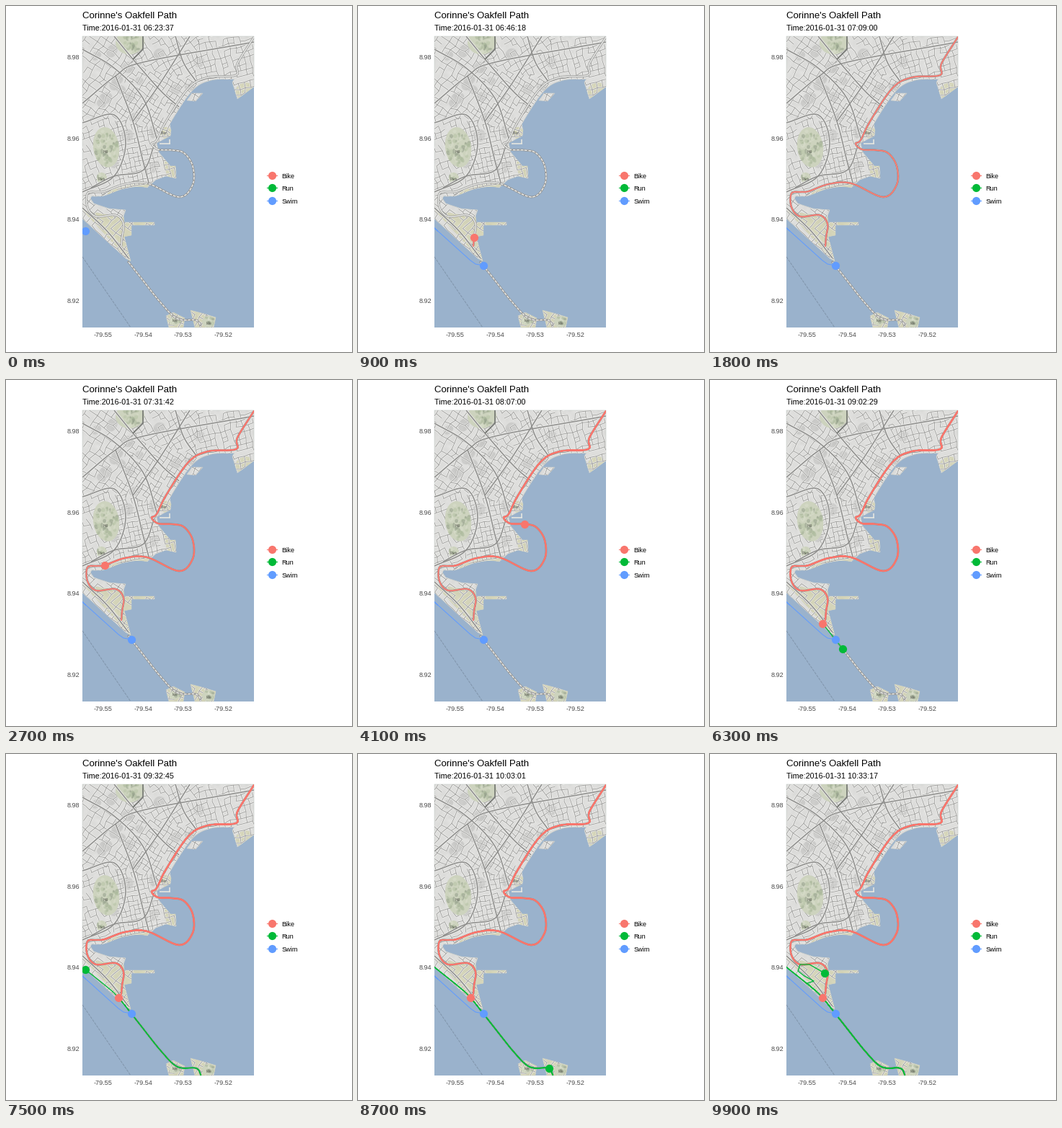
These frames come from a looping animation (480x480 px, 10000 ms). A matplotlib script:

```python
import numpy as np
import matplotlib.pyplot as plt
from matplotlib.animation import FuncAnimation
from matplotlib.collections import LineCollection
from matplotlib.patches import Ellipse, PathPatch, Polygon, Rectangle
from matplotlib.path import Path

SIZE, DPI, FRAMES = 480, 100, 100
PX = 72 / DPI
RED, GREEN, BLUE = "#F8766D", "#00BA38", "#619CFF"
LEFT, TOP, RIGHT, BOTTOM = 106, 42, 344, 446

plt.rcParams["font.family"] = "Liberation Sans"
rng = np.random.default_rng(8)

fig = plt.figure(figsize=(SIZE / DPI, SIZE / DPI), dpi=DPI, facecolor="white")
ax = fig.add_axes([0, 0, 1, 1])
ax.set(xlim=(0, SIZE), ylim=(SIZE, 0))
ax.axis("off")


# ---- geometry helpers ---------------------------------------------------
def curve(pts, m=8):
    """Catmull-Rom spline through a few key points."""
    p = np.array(pts, float)
    p = np.vstack([2 * p[0] - p[1], p, 2 * p[-1] - p[-2]])
    t = (np.arange(m) / m)[:, None]
    parts = [0.5 * (2 * b + (c - a) * t + (2 * a - 5 * b + 4 * c - d) * t**2
                    + (3 * b - a - 3 * c + d) * t**3)
             for a, b, c, d in zip(p, p[1:], p[2:], p[3:])]
    return np.vstack(parts + [p[-2:-1]])


def near(route, x, y):
    return int(np.argmin(np.hypot(route[:, 0] - x, route[:, 1] - y)))


def between(route, a, b):
    i, j = near(route, *a), near(route, *b)
    return route[i:j + 1] if i <= j else route[j:i + 1][::-1]


def shuttle(route, stops):
    """Travel along a route from stop to stop; also give each stop's index."""
    path, marks = [route[stops[0]]], [0]
    for i, j in zip(stops, stops[1:]):
        step = 1 if j > i else -1
        path += [route[k] for k in range(i + step, j + step, step)]
        marks.append(len(path) - 1)
    return np.array(path), marks


# ---- routes -------------------------------------------------------------
bike = curve([(160, 333), (161, 321), (163, 302), (152, 290), (125, 292),
              (113, 279), (113, 260), (126, 258), (137, 257), (165, 247),
              (196, 246), (240, 265), (259, 248), (259, 222), (247, 204),
              (231, 200), (211, 199), (202, 191), (209, 186), (222, 160),
              (253, 114), (280, 99), (319, 96), (321, 80), (344, 43)])
bike_far = np.vstack([bike, (530, -130)])
shore_run = curve([(100, 291), (110, 299), (140, 323), (156, 338), (184, 373),
                   (215, 412), (238, 434), (264, 436), (271, 447)])
run_end = [(135, 318), (144, 315), (131, 308), (122, 301), (125, 292),
           (138, 292), (159, 304)]
swim = np.array([(110, 312), (105, 307), (156, 353), (163, 358), (174, 360)], float)


class Track:
    """A path with a marker at its head; knots pair frames with vertices."""

    def __init__(self, pts, knots, color, width):
        self.pts = pts
        self.dist = np.r_[0, np.cumsum(np.hypot(*np.diff(pts, axis=0).T))]
        self.when = [frame for frame, _ in knots]
        self.where = [self.dist[i] for _, i in knots]
        self.line, = ax.plot([], [], color=color, lw=width * PX, zorder=10,
                             solid_joinstyle="round")
        self.dot, = ax.plot([], [], "o", color=color, ms=11.2 * PX, mew=0,
                            zorder=11)

    def update(self, n):
        if n < self.when[0]:
            self.line.set_data([], [])
            self.dot.set_data([], [])
            return
        d = np.interp(n, self.when, self.where)
        head = [np.interp(d, self.dist, axis) for axis in self.pts.T]
        self.line.set_data(*np.vstack([self.pts[self.dist < d], head]).T)
        self.dot.set_data([head[0]], [head[1]])


far, turn = len(bike), near(bike, 126, 258)
bike_path, b = shuttle(bike_far, [0, far, near(bike, 137, 257), turn, far,
                                  near(bike, 231, 200), turn, far, 0])
bike_path = np.vstack([bike_path, (156, 338)])

south = len(shore_run) - 1
run_path, r = shuttle(shore_run, [near(shore_run, *p) for p in (
    (156, 338), (184, 373), shore_run[south], (110, 299), shore_run[0],
    shore_run[south], (140, 323))])
run_path = np.vstack([run_path, run_end])

tracks = [
    Track(bike_path, [(8.8, 0), (9, near(bike, 161, 321)), (27, b[2]),
                      (41, b[5]), (61, -1)], RED, 1.8),
    Track(run_path, [(61.4, 0), (63, r[1]), (75, r[3]), (99, -1)], GREEN, 1.35),
    Track(swim, [(0, 0), (8.3, -1)], BLUE, 1.05),
]

# ---- base map -----------------------------------------------------------
north_shore = between(bike, (312, 98), (222, 160)) + (5, 4)
south_shore = between(bike, (196, 246), (118, 258)) + (0, 6)
old_town = [(229, 172), (228, 180), (209, 190), (212, 203), (228, 222),
            (235, 222), (236, 239), (222, 236), (208, 241)]
west_bay = [(117, 267), (122, 274), (143, 281), (166, 283), (163, 292)]
pier = [(164, 300), (206, 300), (206, 304), (174, 304), (174, 318)]
mainland = np.vstack([
    [(LEFT, TOP), (RIGHT, TOP), (RIGHT, 112), (321, 129), (314, 106)],
    north_shore, old_town, south_shore, west_bay, pier,
    [(164, 320), (173, 354), (166, 350), (LEFT, 295)]])
isles = [[(222, 430), (232, 425), (248, 433), (246, 446), (226, 446)],
         [(256, 422), (275, 427), (291, 432), (288, 446), (262, 446)],
         [(251, 131), (258, 121), (273, 121), (263, 132)]]

panel = ax.add_patch(Rectangle((LEFT, TOP), RIGHT - LEFT, BOTTOM - TOP,
                               fc="#9AB2CC", lw=0, zorder=0))
shape = Path.make_compound_path(
    *[Path(np.vstack([p, p[:1]]), closed=True) for p in [mainland] + isles])
land = ax.add_patch(PathPatch(shape, fc="#E5E5E3", ec="#C9CFCB", lw=0.6 * PX,
                              zorder=1))


def clip(artist, region=land):
    artist.set_clip_path(region)
    return artist


def blob(x, y, w, h, angle, color, alpha=1.0, z=2.2):
    clip(ax.add_patch(Ellipse((x, y), w, h, angle=angle, fc=color, lw=0,
                              alpha=alpha, zorder=z)))


def strokes(segs, layers, z, region=land):
    for color, width in layers:
        clip(ax.add_collection(LineCollection(
            segs, colors=color, linewidths=width * PX, zorder=z)), region)
        z += 0.05


# beige shores and islands
beige = "#DADABD"
for pts in isles[:2] + [[(106, 283), (150, 291), (208, 298), (208, 306),
                         (165, 322), (175, 358)]]:
    clip(ax.add_patch(Polygon(pts, fc=beige, lw=0, zorder=2)))
for spot in [(230, 226, 18, 40, -15), (170, 254, 60, 10, -12),
             (222, 176, 16, 16, 0), (330, 117, 26, 20, -30)]:
    blob(*spot, beige)

# grey parcels and light relief
for x, y in zip(rng.uniform(108, 270, 24), rng.uniform(45, 225, 24)):
    blob(x, y, *rng.uniform(9, 20, 2), rng.uniform(-60, 60), "#CBCBC9", 0.75)
clip(ax.imshow(rng.normal(0, 1, (101, 60)), cmap="gray", alpha=0.07,
               extent=(LEFT, RIGHT, BOTTOM, TOP), interpolation="bilinear",
               zorder=2.5, aspect="auto"))

# wooded hills
for x, y, w, h in [(139, 196, 36, 56), (133, 239, 14, 16), (172, 50, 40, 34),
                   (234, 437, 16, 12), (281, 438, 18, 16)]:
    blob(x, y, w, h, -8, "#CDD3BE", z=3.15)
    for _ in range(w * h // 30):
        rad, a = 0.43 * np.sqrt(rng.random()), rng.uniform(0, 2 * np.pi)
        blob(x + w * rad * np.cos(a), y + h * rad * np.sin(a),
             rng.uniform(2, 6), rng.uniform(3, 8), rng.uniform(-40, 40),
             rng.choice(["#A9B79A", "#B7C4A6", "#929E88", "#DADFCD"]), 0.55,
             z=3.2)

# streets: each district has a centre, a grid angle and a block size
districts = np.array([
    (212, 125, -58, 7), (225, 58, -30, 8), (305, 70, -14, 8), (128, 95, 35, 9),
    (185, 215, -12, 6.5), (122, 215, -22, 8), (135, 310, 41, 8),
    (235, 437, 20, 7), (275, 435, 30, 7)])


def grid(k):
    x, y, angle, step = districts[k]
    u, v = np.meshgrid(*[np.arange(-20, 21) * step] * 2)
    a = np.radians(angle)
    nodes = np.dstack([x + u * np.cos(a) - v * np.sin(a),
                       y + u * np.sin(a) + v * np.cos(a)])
    nodes += rng.normal(0, step**2 / 70, nodes.shape)
    segs = np.concatenate([
        np.stack([nodes[:, :-1], nodes[:, 1:]], 2).reshape(-1, 2, 2),
        np.stack([nodes[:-1], nodes[1:]], 2).reshape(-1, 2, 2)])
    gaps = segs.mean(axis=1)[:, None] - districts[:, :2]
    own = np.hypot(*gaps.T).argmin(axis=0) == k
    return segs[own & (rng.random(len(segs)) < 0.75)]


streets = np.concatenate([grid(k) for k in range(len(districts))])
streets = streets[shape.contains_points(streets.mean(axis=1), radius=2)]
strokes(streets, [("#F6F6F4", 2.2), ("#9C9C9A", 0.95)], 3)

roads = [curve(p) for p in (
    [(106, 135), (152, 97), (190, 78), (344, 50)],
    [(150, 42), (178, 76), (215, 118), (240, 140)],
    [(106, 60), (150, 86), (190, 128), (210, 186)],
    [(106, 162), (150, 151), (166, 190), (150, 236), (106, 258)],
    [(152, 97), (176, 160), (190, 215), (198, 245)],
    [(118, 252), (150, 236), (190, 228), (206, 192)],
    [(176, 160), (212, 110), (255, 42)],
    [(235, 42), (246, 78), (264, 105)],
    [(106, 280), (140, 312), (170, 350)])]
strokes(roads, [("#F2F2F0", 3), ("#8E8E8C", 1.6)], 3.3)
strokes([[(190, 42), (190, 60), (176, 74)]], [("#6F716D", 1.6)], 3.5)

# coast road, viaduct and causeway
causeway = between(shore_run, (168, 352), (271, 446))
viaduct = between(bike, (196, 246), (211, 199))
strokes([bike, causeway], [("#8F908E", 2.8), ("#F0F0EE", 1.4)], 3.6, panel)
strokes([[(213, 191), (228, 191)], [(227, 191), (227, 185)]],
        [("#E8E8E0", 1.6)], 3.6, panel)
for route in (viaduct, causeway):
    clip(ax.plot(*route.T, color="#777", lw=0.9 * PX, ls=(0, (2, 4)),
                 zorder=3.8)[0], panel)

# faint boundary at sea
ax.plot([106, 173], [348, 446], color="#7E92A8", lw=0.9 * PX,
        ls=(0, (4, 1.5)), zorder=3)


# ---- labels and legend --------------------------------------------------
def text(x, y, s, size, color="black", **kw):
    return ax.text(x, y, s, fontsize=size * PX, color=color, **kw)


for x, y, s in [(138, 203, "Hill"), (133, 240, "Park"), (219, 177, "Pier"),
                (234, 437, "Isle"), (281, 441, "Isle")]:
    text(x, y, s, 5, "#55584F", ha="center", va="center", zorder=4)

text(106, 17, "Corinne's Oakfell Path", 13.2)
clock = text(106, 33.7, "", 10.7)
for i in range(4):
    text(102, 74 + 112.6 * i, f"{8.98 - 0.02 * i:.2f}", 9.2, "#4D4D4D", ha="right")
    text(134.5 + 55.7 * i, 459, f"{-79.55 + 0.01 * i:.2f}", 9.2, "#4D4D4D",
         ha="center")
for i, (name, color) in enumerate(zip(("Bike", "Run", "Swim"), (RED, GREEN, BLUE))):
    y = 234.7 + 17.4 * i
    ax.plot([361.7, 375.5], [y, y], color=color, lw=1.1 * PX)
    ax.plot(368.7, y, "o", color=color, ms=11.2 * PX, mew=0)
    text(382.2, y + 4.3, name, 9.1)

for tr in tracks:
    clip(tr.line, panel)
    clip(tr.dot, panel)
ax.set(xlim=(0, SIZE), ylim=(SIZE, 0))


def update(n):
    sec = 6 * 3600 + 23 * 60 + 37 + n * 14980 // 99
    clock.set_text(f"Time:2016-01-31 {sec // 3600:02d}:"
                   f"{sec // 60 % 60:02d}:{sec % 60:02d}")
    for tr in tracks:
        tr.update(n)


anim = FuncAnimation(fig, update, frames=FRAMES, interval=100, repeat=True,
                     repeat_delay=0)
plt.show()
```
